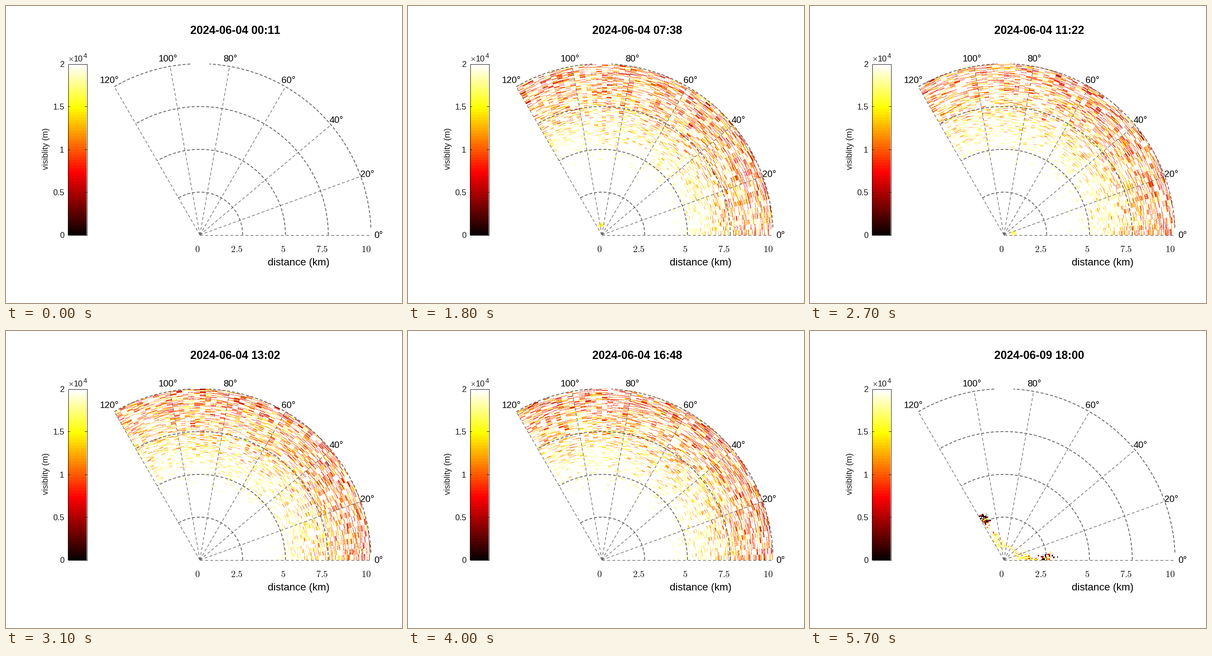
Recreate the animation shown at these times as a matplotlib script. Size 864 px wide and 648 px high, loop 5.8 s.

```python
import numpy as np
import matplotlib.pyplot as plt
from matplotlib.animation import FuncAnimation

W, H, DPI = 864, 648, 100
FRAMES, STEP_MS = 58, 100
PX = 72 / DPI
OX, OY, R = 423, 499.5, 373.5
TOP = OY - R
BEAMS, GATES = 60, 500
VMAX = 2e4
GRID = "#5e5a57"
INK = "#1c1a1a"

plt.rcParams["font.family"] = "Liberation Sans"
plt.rcParams["mathtext.fontset"] = "cm"
plt.rcParams["text.kerning_factor"] = 6

# 64-level "hot" colour map
level = np.arange(1, 65)[:, None]
HOT = np.clip((level - np.array([0, 24, 48])) / np.array([24, 24, 16]), 0, 1)

# Polar cell centres
theta = ((np.arange(BEAMS) + 0.5) * 120 / BEAMS)[:, None]
rad = ((np.arange(GATES) + 0.5) * R / GATES)[None, :]

# Pixels of the sector; each one averages two gates along its beam
X0, X1, Y0, Y1 = 236, 797, 126, 500
px, py = np.meshgrid(np.arange(X0, X1) + 0.5, np.arange(Y0, Y1) + 0.5)
pix_r = np.hypot(px - OX, OY - py)
pix_a = np.degrees(np.arctan2(OY - py, px - OX))
inside = (pix_r < R) & (pix_a >= 0) & (pix_a < 120)
beam = (pix_a[inside] * BEAMS / 120).astype(int)
gates = [np.clip((pix_r[inside] + d) * GATES / R, 0, GATES - 1).astype(int)
         for d in (-0.3, 0.3)]


def ramp(n, start, end):
    return np.clip((n - start) / (end - start), 0, 1)


def coarse(sample, size):
    """Random values shared by runs of neighbouring gates."""
    return sample((BEAMS, GATES // size)).repeat(size, axis=1)


def daylight_noise(n, rng):
    """Visibility hidden by sunlight noise that grows with range."""
    sun = ramp(n, 12, 17) * (1 - ramp(n, 40, 44.6))
    gain = rng.normal(1, 0.12, (BEAMS, 1)) * (1.1 - 0.2 * theta / 120)
    sigma = 0.28 * sun * gain * (rad / R) ** 2.4
    z = rng.normal(size=(BEAMS, GATES)) + 0.25 * coarse(
        lambda s: rng.normal(size=s), 10)
    return 3000 / np.maximum(0.075 + sigma * z, 0.01)


def near_ring(n, rng):
    """Haze near the instrument: a full ring by night, a small spot by day."""
    day = ramp(n, 12, 18) * (1 - ramp(n, 40, 44))
    power = 0.8 * ramp(n, 7, 11) * (1 - ramp(n, 26, 31)) + ramp(n, 40, 44)
    fade = np.clip(1 - (rad - 18) / (40 - 28 * day), 0, 1) * (rad > 18)
    mid = 95 - 85 * ramp(n, 18, 27)
    lobe = 1 - day + day * np.exp(-((theta - mid) / 14) ** 2)
    jitter = rng.normal(1, 0.06, (BEAMS, 1)) + rng.normal(0, 0.03, (BEAMS, GATES))
    return VMAX - 9000 * power * fade * lobe * jitter


def fog(rng):
    """Clumpy banks along both edges, darker with range, and a faint arc."""
    right = rad * np.sin(np.radians(theta))
    left = rad * np.sin(np.radians(120 - theta))
    bank = np.exp(-((right - 4) / 9) ** 2) + np.exp(-((left - 9) / 7) ** 2)
    clump = 0.15 + 0.85 * np.cos(np.pi * rad / 48) ** 2
    arc = np.exp(-((rad - 31) / 3) ** 2)
    chance = bank * clump * (1 - ramp(rad, 95, 122)) + 0.8 * arc
    hit = (coarse(rng.random, 4) < chance) & (rad > 18)
    power = 0.12 + 1.3 * (rad / 90) ** 4
    return np.where(hit, VMAX * coarse(rng.random, 4) ** power, VMAX)


def sector(n):
    rng = np.random.default_rng(n + 40)
    if n == FRAMES - 1:
        vis = fog(rng)
    else:
        vis = np.minimum(daylight_noise(n, rng), near_ring(n, rng))
    color = HOT[np.clip(vis / VMAX * 64, 0, 63).astype(int)]
    img = np.ones(px.shape + (3,))
    img[inside] = sum(color[beam, g] for g in gates) / len(gates)
    return img


def stamp(n):
    if n == FRAMES - 1:
        return "2024-06-09 18:00"
    m = int(np.interp(n, [0, 27, 57], [11, 682.3, 1434.2]))
    return f"2024-06-04 {m // 60:02d}:{m % 60:02d}"


fig = plt.figure(figsize=(W / DPI, H / DPI), dpi=DPI, facecolor="white")
ax = fig.add_axes([0, 0, 1, 1])
ax.axis("off")


def label(x, y, s, size, ha="center", color="black", **kw):
    kw.setdefault("va", "baseline")
    return ax.text(x, y, s, fontsize=size * PX, ha=ha, color=color, **kw)


def stroke(x, y, width, color=GRID, dash=None):
    line, = ax.plot(x, y, color=color, lw=width * PX, dash_capstyle="butt")
    if dash:
        line.set_dashes([d / width for d in dash])


def picture(img, extent):
    return ax.imshow(img, extent=extent, aspect="auto",
                     interpolation="nearest", zorder=1)


def polar(a, r):
    a = np.radians(a)
    return OX + r * np.cos(a), OY - r * np.sin(a)


def arc(a0, a1, r):
    stroke(*polar(np.linspace(a0, a1, 200), r), 1.7, dash=(6.5, 4))


data = picture(sector(0), (X0, X1, Y1, Y0))

# Spokes, rings and their labels
for a in range(0, 121, 20):
    stroke(*polar(a, np.array([0, R])), 1.2, dash=(6.5, 4.5))
    s = f"{a}°"
    x, y = polar(a, R + 17.5)
    label(x - 6 * len(s) + 1, y + 7, s, 20, "left")
for k in range(5):
    label(OX + k * R / 4, 537, f"${2.5 * k:g}$", 20.2, "right", INK)
for k in (1, 2, 3):
    arc(0, 120, R * k / 4)
# The outer ring is cut at the edges of the plot box
arc(2.5, 86.8, R)
arc(93.2, 120, R)
label(638.5, 566, "distance (km)", 22.4)

# Colour bar
picture(HOT[::-1, None, :], (135, 176, 500, 126))
stroke([135.5, 176.5, 176.5, 135.5, 135.5],
       [TOP + 0.5, TOP + 0.5, OY, OY, TOP + 0.5], 1, INK)
for k in range(5):
    y = OY - k * R / 4
    label(127, y + 7, f"{k / 2:g}", 18, "right", INK)
    if 0 < k < 4:
        stroke([135, 139], [y, y], 1, INK)
        stroke([172, 176], [y, y], 1, INK)
label(142, 122, "×", 18, color="#555050")
label(148, 121, "10", 18, "left", INK)
label(169, 113, "4", 14.5, "left", INK)
label(96, 311.5, "visiblity (m)", 18.2, "right", INK, va="center", rotation=90)

title = label(402, 61, stamp(0), 24.6, "left", weight="bold")
ax.set_xlim(0, W)
ax.set_ylim(H, 0)


def update(n):
    data.set_data(sector(n))
    title.set_text(stamp(n))
    return data, title


anim = FuncAnimation(fig, update, frames=FRAMES, interval=STEP_MS,
                     repeat=True, repeat_delay=0, blit=False)
plt.show()
```
